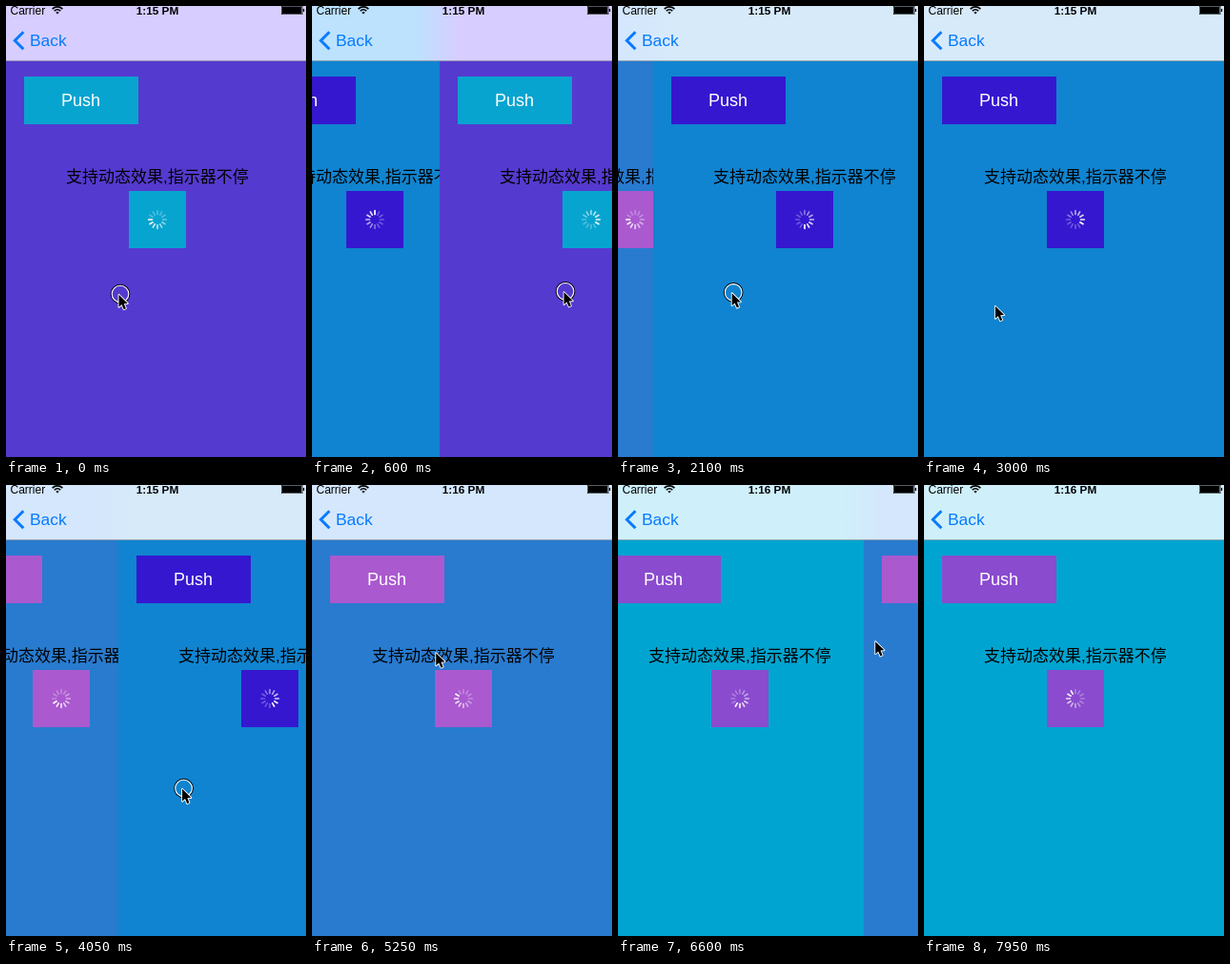
An HTML page with a canvas for the animation above (8 s loop, 315 by 473 pixels).

```html
<!DOCTYPE html>
<html lang="zh">
<head>
<meta charset="utf-8">
<title>Swipe back</title>
<style>
html, body { margin: 0; width: 100%; height: 100%; overflow: hidden; }
canvas { display: block; width: 315px; height: 473px; }
</style>
</head>
<body>
<canvas id="stage"></canvas>
<script>
const W = 315, H = 473, SCREEN = 320, NAV = 58;
const LOOP = 8000, STEP = 150;
const SLOP = 12, SETTLE = 300;
const SANS = '"Liberation Sans", "Noto Sans CJK SC", "Noto Sans CJK", sans-serif';
const canvas = document.getElementById('stage');
const ctx = canvas.getContext('2d');
const ratio = window.devicePixelRatio || 1;
canvas.width = W * ratio;
canvas.height = H * ratio;
ctx.scale(ratio, ratio);

// spin: turns of the activity indicator at time zero
// veil: bar tint while the page is still being uncovered
const pages = [
  { bg: '#553acf', box: '#08a4d0', bar: '#d7ceff', spin: 0.75 },
  { bg: '#1084d0', box: '#3517d0', bar: '#d7eafa', veil: '#bce2fd', spin: 0.4 },
  { bg: '#287bcf', box: '#aa59cf', bar: '#d4e7fc', spin: 0.65 },
  { bg: '#00a4d0', box: '#8a4bcf', bar: '#cff0fa', spin: 0 }
];

// each drag moves the pointer from a to b; pops tells if the page leaves on release
const drags = [
  { from: 0, to: 750, a: [120, 302], b: [283, 299], pops: true },
  { from: 1800, to: 2270, a: [72, 299], b: [142, 301], pops: false },
  { from: 3450, to: 4475, a: [56.5, 318], b: [264, 318], pops: true },
  { from: 5500, to: 6475, a: [122, 165], b: [272, 155], pops: true }
];
const exit = { from: 7950, a: [262, 490] };

const clamp = u => Math.max(0, Math.min(1, u));
const smooth = u => u * u * (3 - 2 * u);
const easeOut = u => 1 - (1 - u) ** 2;
const lerp = (a, b, p) => a + (b - a) * p;
const between = (a, b, p) => a.map((v, i) => lerp(v, b[i], p));

// top page, its left edge and the pointer at time t
function stateAt(t) {
  const last = drags.filter(d => d.from <= t).pop();
  const next = drags[drags.indexOf(last) + 1] || exit;
  let top = drags.filter(d => d.pops && d.to + SETTLE <= t).length;
  const pressed = t < last.to;
  const reach = smooth(clamp((t - last.from) / (last.to - last.from)));
  const glide = smooth(clamp((t - last.to) / (0.9 * (next.from - last.to))));
  const hand = between(last.a, last.b, reach);
  const pulled = Math.max(0, hand[0] - last.a[0] - SLOP);
  const release = easeOut(clamp((t - last.to) / SETTLE));
  const x = release === 1 ? 0 : lerp(pulled, last.pops ? SCREEN : 0, release);
  return { top, x, pressed, pointer: between(hand, next.a, glide) };
}

function rect(x, y, w, h, color) {
  ctx.fillStyle = color;
  ctx.fillRect(x, y, w, h);
}

function label(text, x, y, size, color, align = 'left', weight = 400) {
  ctx.font = `${weight} ${size}px ${SANS}`;
  ctx.textAlign = align;
  ctx.fillStyle = color;
  ctx.fillText(text, x, y);
}

function path(points) {
  ctx.beginPath();
  points.forEach(([x, y]) => ctx.lineTo(x, y));
}

function spinner(x, y, turns) {
  const head = Math.floor((turns % 1) * 12 + 1e-6);
  ctx.lineWidth = 1.7;
  ctx.lineCap = 'round';
  for (let i = 0; i < 12; i++) {
    const lag = (head - i + 12) % 12;
    const a = i * Math.PI / 6, sx = Math.sin(a), sy = -Math.cos(a);
    ctx.strokeStyle = `rgba(255,255,255,${Math.max(0.28, 1 - lag * 0.1)})`;
    ctx.beginPath();
    ctx.moveTo(x + sx * 5.6, y + sy * 5.6);
    ctx.lineTo(x + sx * 9.3, y + sy * 9.3);
    ctx.stroke();
  }
  ctx.lineCap = 'butt';
}

function drawPage(page, x, t) {
  ctx.save();
  ctx.translate(Math.round(x), 0);
  rect(0, 0, SCREEN, H, page.bg);
  rect(19, 74, 120, 50, page.box);
  label('Push', 78.5, 105, 18, '#fff', 'center');
  label('支持动态效果,指示器不停', 63, 185, 17, '#000', 'left', 300);
  rect(129, 194, 60, 60, page.box);
  spinner(159, 224, page.spin + t / 1000);
  ctx.restore();
}

function drawBar(top, x, t) {
  let fill = pages[top].bar;
  if (x > 0) {
    const below = pages[top + 1];
    fill = ctx.createLinearGradient(x - 26, 0, x + 20, 0);
    fill.addColorStop(0, below.veil || below.bar);
    fill.addColorStop(1, pages[top].bar);
  }
  rect(0, 0, W, NAV, fill);
  rect(0, NAV - 1, W, 1, 'rgba(0,0,0,.3)');

  label('Carrier', 4.5, 9, 12, '#000');
  label(t < 4500 ? '1:15 PM' : '1:16 PM', 159, 9, 11.8, '#000', 'center', 700);
  drawWifi(54, 8.5);
  drawBattery();

  ctx.strokeStyle = '#077aff';
  ctx.lineWidth = 3;
  path([[18.3, 27.3], [9.3, 36.3], [18.3, 45.3]]);
  ctx.stroke();
  label('Back', 25, 42, 17.4, '#077aff');
}

function drawWifi(x, y) {
  const sweep = [-Math.PI * 0.75, -Math.PI * 0.25];
  ctx.strokeStyle = ctx.fillStyle = '#000';
  ctx.lineWidth = 1.6;
  for (const r of [4.6, 7.6]) {
    ctx.beginPath();
    ctx.arc(x, y, r, ...sweep);
    ctx.stroke();
  }
  ctx.beginPath();
  ctx.moveTo(x, y);
  ctx.arc(x, y, 2.4, ...sweep);
  ctx.fill();
}

function drawBattery() {
  ctx.strokeStyle = '#000';
  ctx.lineWidth = 0.6;
  ctx.strokeRect(289.3, 0.3, 21.8, 8.4);
  rect(290, 1, 20.4, 7, '#000');
  rect(311.8, 3, 1.4, 3, '#000');
}

function ring(x, y, r, color) {
  ctx.strokeStyle = color;
  ctx.lineWidth = 1.1;
  ctx.beginPath();
  ctx.arc(x, y, r, 0, Math.PI * 2);
  ctx.stroke();
}

function drawPointer([x, y], pressed) {
  if (pressed) {
    ring(x, y, 9.8, '#000');
    ring(x, y, 8.8, '#fff');
  }
  ctx.save();
  ctx.translate(x - 1.5, y + 0.8);
  path([[0, 0], [0, 13], [3, 10.3], [5.2, 15.4], [7.4, 14.4], [5.3, 9.4], [9.3, 9.2]]);
  ctx.closePath();
  ctx.lineWidth = 1.8;
  ctx.lineJoin = 'round';
  ctx.strokeStyle = '#fff';
  ctx.stroke();
  ctx.fillStyle = '#000';
  ctx.fill();
  ctx.restore();
}

function draw(t) {
  const { top, x, pressed, pointer } = stateAt(t);
  // the page below follows at half speed
  if (x > 0) drawPage(pages[top + 1], (x - SCREEN) / 2, t);
  drawPage(pages[top], x, t);
  drawBar(top, x, t);
  drawPointer(pointer, pressed);
}

const start = performance.now();
function frame() {
  const t = Math.max(0, performance.now() - start) % LOOP;
  draw(Math.floor(t / STEP) * STEP);
  requestAnimationFrame(frame);
}
frame();
</script>
</body>
</html>
```
